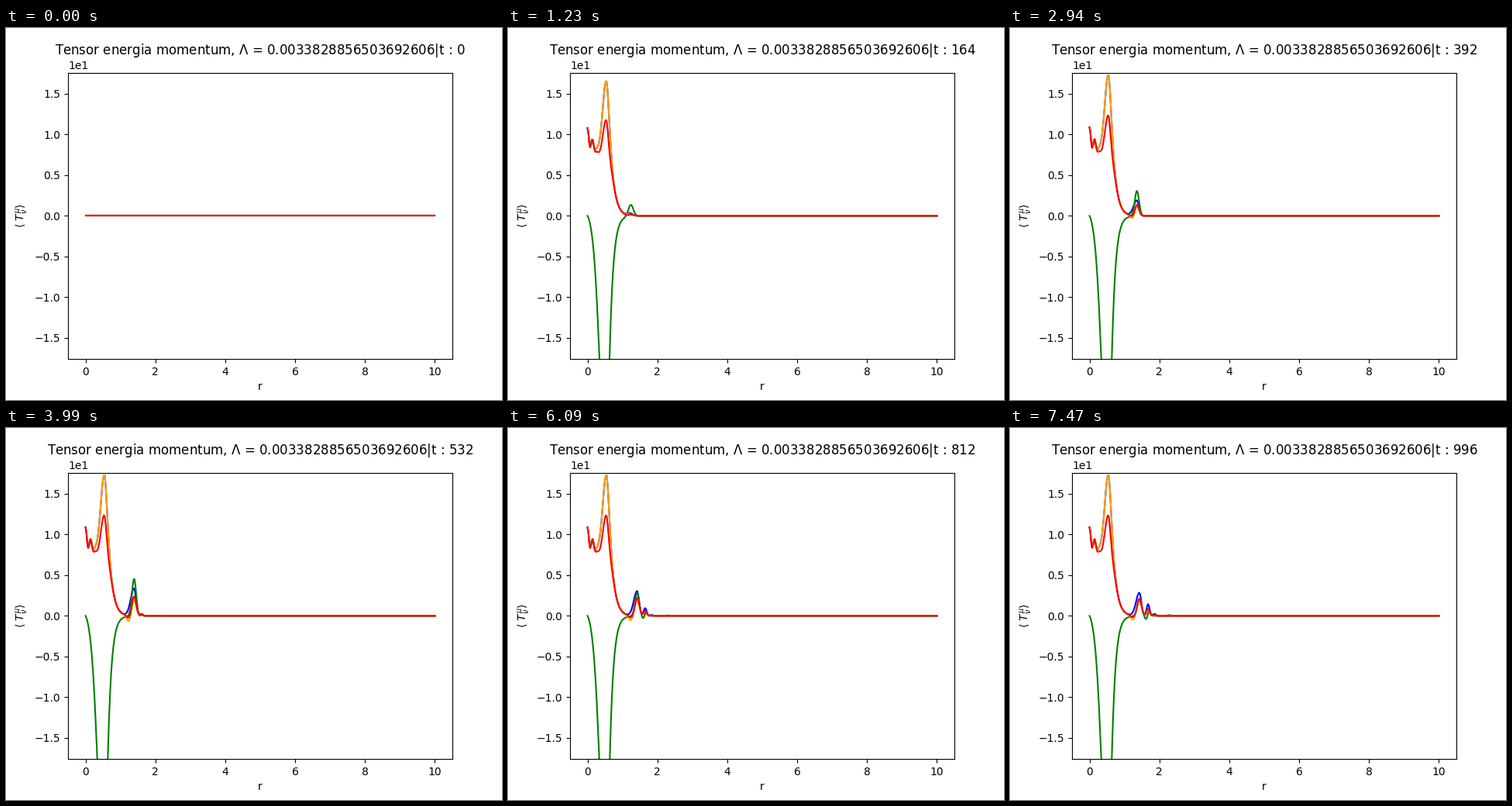
Animation, 640 px wide and 480 px high, one loop 7.5 s. Source, as a matplotlib script:

```python
import numpy as np
import matplotlib.pyplot as plt
from matplotlib.animation import FuncAnimation

FRAMES, INTERVAL, STEP = 250, 30, 4
COLLAPSE, CREST, ECHO, END = 96, 532, 450, 996
LAMBDA = "0.0033828856503692606"
r = np.linspace(0, 10, 401)


def hump(x, c, left, right=None):
    """Gaussian of height one with its own width on each side."""
    w = np.where(x < c, left, right or left)
    return np.exp(-((x - c) / w)**2 / 2)


def peak(x, c, top, base, width, a, b):
    """Gaussian rise from base to top, then a rounded exponential fall."""
    rise = base + (top - base) * hump(x, c, width)
    fall = top * np.exp(-b * (np.hypot(1, (x - c) / a) - 1))
    return np.where(x < c, rise, fall)


def core(t):
    """Central pressure, flux and density: grow, then freeze."""
    u = min(t / COLLAPSE, 1)
    s = u * u * (3 - 2 * u)
    x = r / (1.5 - .5 * s)
    calm = np.exp(-max(t - COLLAPSE, 0) / 35)

    def settle(start, end):
        return end + (start - end) * calm

    c = settle(.52, .54)
    pressure = peak(x, c, settle(12.15, 17.35), settle(7.6, 7.9),
                    settle(.085, .103), .075, .68)
    q = settle(.2, .7)
    ring = (1 + q * np.cos(2 * np.pi * x / settle(.12, .155))) / (1 + q)
    pressure += settle(2.6, 3) * ring * np.exp(-(x / .185)**2)
    flux = -np.tanh(x / .07) * peak(x, c, settle(24, 32), 0,
                                    settle(.17, .185), .05, .5)
    density = pressure - settle(4, 5) * hump(x, .55, .13, .09)
    pressure += .45 * calm * hump(x, 1.16, .08, .1)
    density -= .55 * calm * hump(x, 1.11, .09, .12)
    return s * pressure, s * flux, s * density


def ripples(t):
    """Outer waves, in the order of the lines."""
    d = max(t - COLLAPSE, 0)
    late = max(t - CREST, 0)
    swell = min(d / (CREST - COLLAPSE), 1)**1.5
    echo = max(t - ECHO, 0) / (END - ECHO)
    early = min(t / COLLAPSE, 1)**3

    c = 1.18 + .255 * (1 - np.exp(-d / 250))
    c2 = c + .19 + .06 * echo
    w = .06 * (1 + .5 * np.exp(-d / 60))
    main, second = hump(r, c, w), hump(r, c2, .042)
    third = echo**2 * hump(r, c2 + .18, .04)
    dip = swell * np.exp(-late / 1200) * hump(r, 1.235, .05)

    blue = (3.4 * swell * np.exp(-late / 2600) * hump(r, c, .095, .055)
            + 1.45 * echo * second + .25 * third)
    green = ((1.2 * early + 3.4 * swell) * np.exp(-late / 580) * main
             + echo**.5 * (.55 * hump(r, c2 + .03, .037)
                           - .45 * hump(r, c2 - .06, .035))
             + .1 * echo * hump(r, 2.28, .05))
    orange = 2 * swell * main - .8 * dip + .8 * echo * second
    red = (2.4 * swell * np.exp(-late / 3500) * main - .35 * dip
           + .9 * echo * second + .12 * third)
    return blue, green, orange, red


fig, ax = plt.subplots(figsize=(6.4, 4.8), dpi=100)
lines = [ax.plot(r, 0 * r, color=c)[0]
         for c in ("blue", "green", "orange", "red")]
ax.set_ylim(-17.6, 17.6)
ax.set_xlabel("r")
ax.set_ylabel(r"$\langle \ T^{\mu}_{\nu} \rangle$")
ax.ticklabel_format(axis="y", style="sci", scilimits=(0, 0))


def update(i):
    t = i * STEP
    pressure, flux, density = core(t)
    inner = pressure, flux, pressure, density
    for line, y, wave in zip(lines, inner, ripples(t)):
        line.set_ydata(y + wave)
    ax.set_title(rf"Tensor energia momentum, $\Lambda$ = {LAMBDA}|t : {t}")
    return lines


anim = FuncAnimation(fig, update, frames=FRAMES, interval=INTERVAL,
                     repeat=True, repeat_delay=0)
plt.show()
```
